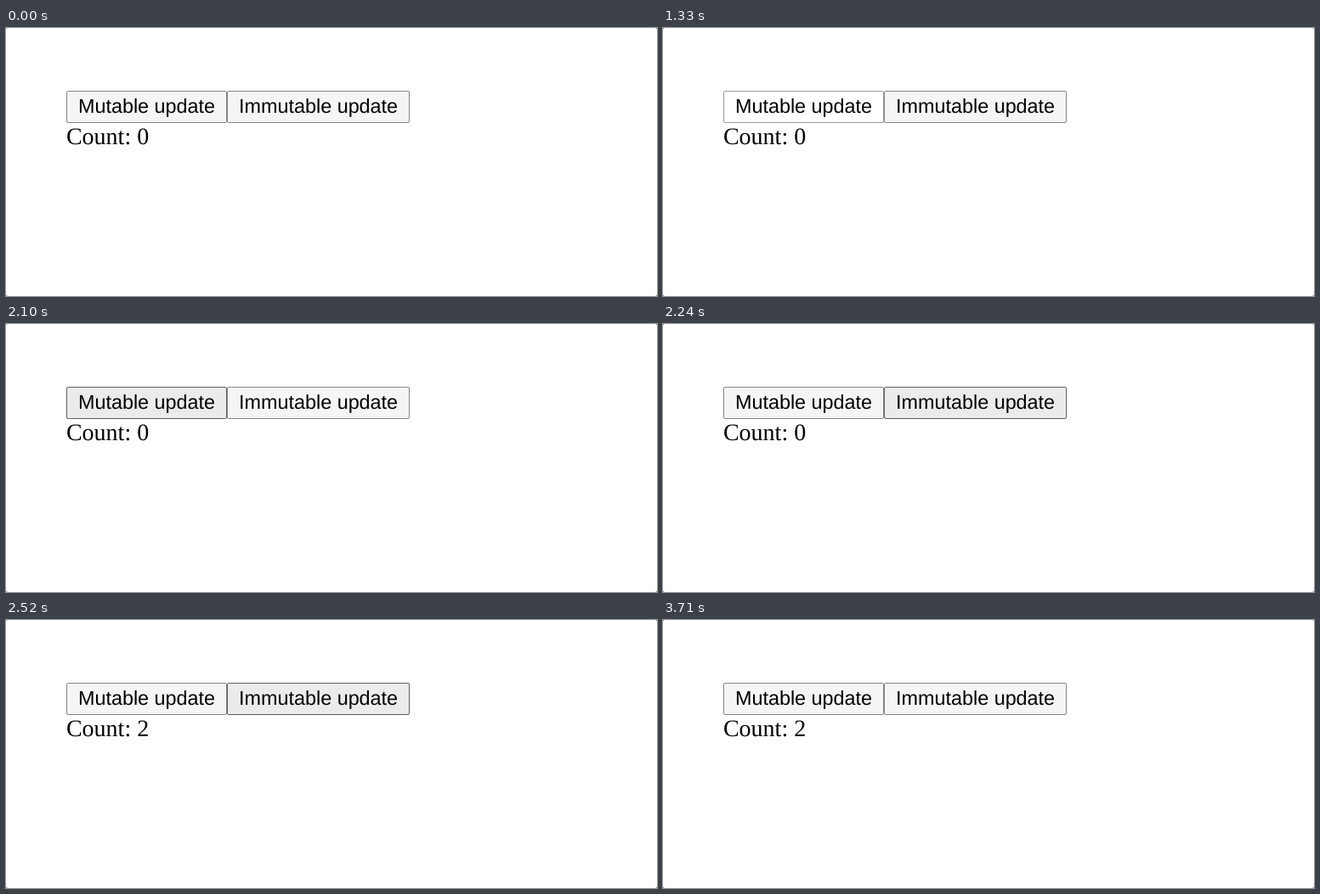
Recreate the animation shown at these times as an HTML page. Size 766 px wide and 316 px high, loop 3.85 s.

```html
<!DOCTYPE html>
<html lang="en">
<head>
<meta charset="utf-8">
<title>Mutable and immutable update</title>
<style>
  html, body { margin: 0; width: 100%; height: 100%; overflow: hidden; background: #fff; }
  svg { display: block; width: 766px; height: 316px; }
  text { text-rendering: geometricPrecision; fill: #000; }
  .label { font: 23.36px Arial, "Liberation Sans", sans-serif; }
  .count { font: 28.03px "Times New Roman", "Liberation Serif", serif; }
  .normal { fill: #f5f5f5; stroke: #858585; }
  .hover { fill: #ebebeb; stroke: #606060; }
  .active { fill: #fff; stroke: #999; }
</style>
</head>
<body>
<svg viewBox="0 0 766 316">
  <rect width="766" height="316" fill="#555"/>
  <rect width="766" height="316" rx="2" fill="#fff"/>
  <rect id="mutable" class="normal" x="71.5" y="74.5" width="188" height="37" rx="1.5"/>
  <rect id="immutable" class="normal" x="260.5" y="74.5" width="214" height="37" rx="1.5"/>
  <text class="label" x="85" y="100">Mutable update</text>
  <text class="label" x="274.1" y="100">Immutable update</text>
  <text class="count" id="count" x="70.9" y="137">Count: 0</text>
</svg>
<script>
  const LOOP = 3850;
  // start time, mutable button, immutable button, count
  const steps = [
    [0, "normal", "normal", 0],
    [1330, "active", "normal", 0],
    [1400, "hover", "normal", 0],
    [2240, "normal", "hover", 0],
    [2450, "normal", "active", 0],
    [2520, "normal", "hover", 2],
    [3500, "normal", "normal", 2],
  ];
  const [mutable, immutable, count] =
    ["mutable", "immutable", "count"].map(id => document.getElementById(id));
  const start = performance.now();

  function draw() {
    const time = (performance.now() - start) % LOOP;
    const [, first, second, value] = steps.findLast(step => step[0] <= time);
    mutable.setAttribute("class", first);
    immutable.setAttribute("class", second);
    count.textContent = `Count: ${value}`;
    requestAnimationFrame(draw);
  }
  draw();
</script>
</body>
</html>
```
